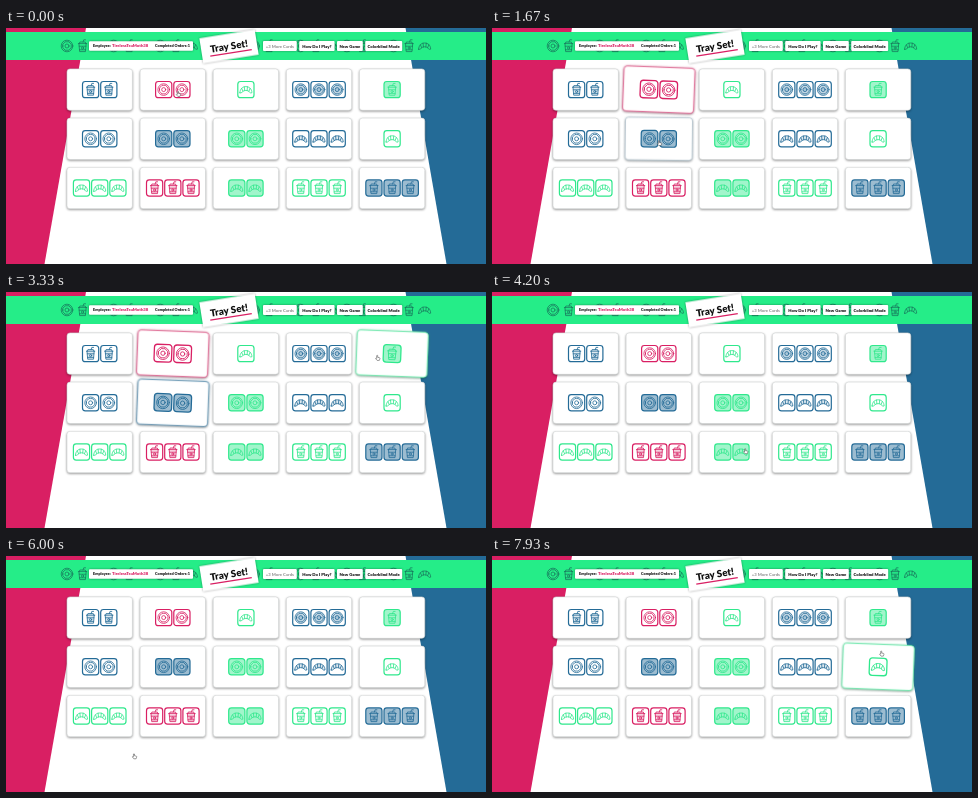
An HTML page that plays this animation: 480 px wide and 236 px high, repeating every 8 s.

```html
<!DOCTYPE html>
<html lang="en">
<head>
<meta charset="utf-8">
<title>Card table</title>
<style>
  html, body { margin: 0; width: 100%; height: 100%; overflow: hidden; background: #fff; }
  svg { display: block; width: 100vw; height: 100vh; }
  text { font: 900 4.25px Lato, "Open Sans", sans-serif; fill: #111; }
  .small { font-size: 3.8px; }
  .box { fill: #fff; filter: drop-shadow(0 .8px .8px #0006); }
  .card { fill: #fff; stroke: #d0d3d4; stroke-width: .6; filter: drop-shadow(0 1.2px .9px #0006); }
  .line { fill: none; stroke-linecap: round; stroke-linejoin: round; }
</style>
</head>
<body>
<svg id="stage" viewBox="0 0 480 236" preserveAspectRatio="none">
  <defs>
    <g id="donut">
      <circle r="5.8"/><circle r="2"/>
      <path d="M-4.3 0Q-5-2.4-2.8-2.9Q-2-5 0-4.2Q2.4-5 3-2.8Q5-2 4.2 0Q5 2.4 2.8 2.9Q2 5 0 4.2Q-2.4 5-3 2.8Q-5 2-4.3 0Z"/>
    </g>
    <g id="cup">
      <path d="M-4.2-2.4H4.2M-3.6-2.4L-2.9 5.6H2.9L3.6-2.4M-3.2-2.6L-2.7-4H2.7L3.2-2.6M.5-4L1.2-6.2H3"/>
      <path d="M-3.3 .2H3.3M-3 3.8H3"/><circle cy="2" r="1.1"/>
    </g>
    <g id="bun">
      <path d="M-6 3.2C-6-.6-3.4-3 0-3S6-.6 6 3.2Q4.6 3.8 3.8 2.6Q2.4 .8 0 .8T-3.8 2.6Q-4.6 3.8-6 3.2Z"/>
      <path d="M-4.2-1.2L-3 1.6M-1.6-2.8L-1.2 .9M1.6-2.8L1.2 .9M4.2-1.2L3 1.6"/>
    </g>
  </defs>
  <path fill="#d91f63" d="M0 0H240V236H0Z"/>
  <path fill="#246b97" d="M240 0H480V236H240Z"/>
  <path fill="#fff" d="M80 0H399.5L440.5 236H38.5Z"/>
  <path fill="#25ed88" d="M0 4H480V32H0Z"/>
  <g id="strip" class="line" stroke="#176f59" stroke-width=".7"></g>
  <rect class="box" x="83" y="13.3" width="104" height="9.4" rx="1"/>
  <text class="small" x="87" y="19.4">Employee:</text>
  <text x="106" y="19.4" style="fill:#d91f63">TirelessTeaMoth38</text>
  <text class="small" x="149" y="19.4">Completed Orders:</text>
  <text class="small" x="181.8" y="19.4">1</text>
  <g id="buttons"></g>
  <g transform="translate(223 18.5) rotate(-9)">
    <rect class="box" x="-28" y="-12.7" width="56" height="25.4"/>
    <text y="3.2" text-anchor="middle" style="font-size:9.8px">Tray Set!</text>
    <path d="M-20 6.6H22" stroke="#d91f63" stroke-width="1.2"/>
  </g>
  <g id="cards"></g>
  <path id="hand" fill="#fff" stroke="#333" stroke-width=".6" stroke-linejoin="round"
    d="M-.5 0Q.2-.7 .8 0V2.2L3 2.6Q3.8 3 3.5 4L2.8 6H0L-1.9 3.7Q-1.8 2.8-.5 3.4Z"/>
</svg>
<script>
const $ = id => document.getElementById(id);
const LOOP = 8000, FADE = 200;
const shapes = { d: "donut", c: "cup", b: "bun" };
const colors = { r: "#d91f63", b: "#246b97", g: "#2fe88c" };
const use = (shape, x, y = 0) => `<use href="#${shape}" x="${x}" y="${y}"/>`;

// Header pattern and buttons
for (let i = 0; i < 24; i++)
  $("strip").innerHTML += use("dcb"[i % 3].replace(/./, c => shapes[c]), 61 + i * 15.55, 18);

let left = 257;
for (const label of ["+3 More Cards", "How Do I Play?", "New Game", "Colorblind Mode"]) {
  const w = 13 + label.length * 1.6;
  $("buttons").innerHTML += `<rect class="box" x="${left}" y="13" width="${w}" height="10" rx="1"/>
    <text x="${left + w / 2}" y="19.6" text-anchor="middle"
      style="fill:${label[0] == "+" ? "#999" : "#111"}">${label}</text>`;
  left += w + 2.4;
}

// Each code: shape, count, color, fill (open, striped or solid)
const deck = "c2bs d2ro b1go d3bs c1gf d2bo d2bf d2gf b3bs b1go b3go c3rs b2gf c3go c3bf".split(" ");

function tiles([shape, count, color, fill]) {
  let out = "";
  for (let i = 0; i < count; i++) {
    const x = (i - (count - 1) / 2) * 18.2;
    out += `<rect x="${x - 8.1}" y="-8.1" width="16.2" height="16.2" rx="2.8" stroke-width="1.2"
      fill="${fill == "f" ? colors[color] : "#fff"}" fill-opacity=".45"/>` + use(shapes[shape], x);
  }
  return `<g class="line" stroke="${colors[color]}" stroke-width=".8"
    ${fill == "s" ? `fill="${colors[color]}" style="fill:${colors[color]};fill-opacity:.15"` : ""}>${out}</g>`;
}

const cards = deck.map((code, i) => {
  const g = document.createElementNS("http://www.w3.org/2000/svg", "g");
  const rect = 'x="-32.7" y="-20.7" width="65.4" height="41.4" rx="3"';
  const color = colors[code[2]];
  g.innerHTML = `<rect class="card" ${rect}/>
    <rect ${rect} fill="#fff" stroke="${color}" stroke-opacity=".6" stroke-width=".7"
      style="filter:drop-shadow(0 .8px 1px ${color}b0)"/>` + tiles(code);
  $("cards").append(g);
  return { g, glow: g.children[1], x: 93.7 + (i % 5) * 73.1, y: 61.6 + Math.floor(i / 5) * 49.2 };
});

// Pointer stops: card, arrive, leave, horizontal offset; picked cards stay up until the check
const CHECK = 3800;
const stops = [
  { card: 1, on: 670, off: 1400, dx: 5, picked: true },
  { card: 6, on: 1600, off: 2050, dx: 0, picked: true },
  { card: 3, on: 2330, off: 2500, dx: -16 },
  { card: 4, on: 2900, off: 3500, dx: -15, picked: true },
  { card: 11, on: 4800, off: 5300, dx: -7 },
  { card: 10, on: 6550, off: 7000, dx: 12 },
  { card: 9, on: 7600, off: LOOP + FADE, dx: 3 }
];

const clamp = p => Math.min(1, Math.max(0, p));
const ease = p => (p = clamp(p)) * p * (3 - 2 * p);

function pointer(t) {
  const n = Math.max(0, stops.findLastIndex(s => s.on <= t || s.off <= t));
  const from = stops[n], to = stops[n + 1] || from;
  const gap = to.on - from.off, p = ease((t - from.off) / gap);
  const a = cards[from.card], b = cards[to.card];
  const mix = (u, v) => u + (v - u) * p;
  const sag = gap * .03 * Math.sin(Math.PI * p); // long moves swing low
  return [mix(a.x + from.dx, b.x + to.dx), mix(a.y, b.y) + 2 + sag];
}

function draw(t) {
  cards.forEach(({ g, glow, x, y }, i) => {
    const s = stops.find(s => s.card == i);
    const k = s ? ease((t - s.on) / FADE) - ease((t - (s.picked ? CHECK : s.off)) / FADE) : 0;
    g.setAttribute("transform", `translate(${x} ${y}) rotate(${2.2 * k}) scale(${1 + .08 * k})`);
    glow.setAttribute("opacity", k);
  });
  $("hand").setAttribute("transform", `translate(${pointer(t)}) scale(.8)`);
}

const start = performance.now();
function tick() {
  draw((performance.now() - start) % LOOP);
  requestAnimationFrame(tick);
}
tick();
</script>
</body>
</html>
```
